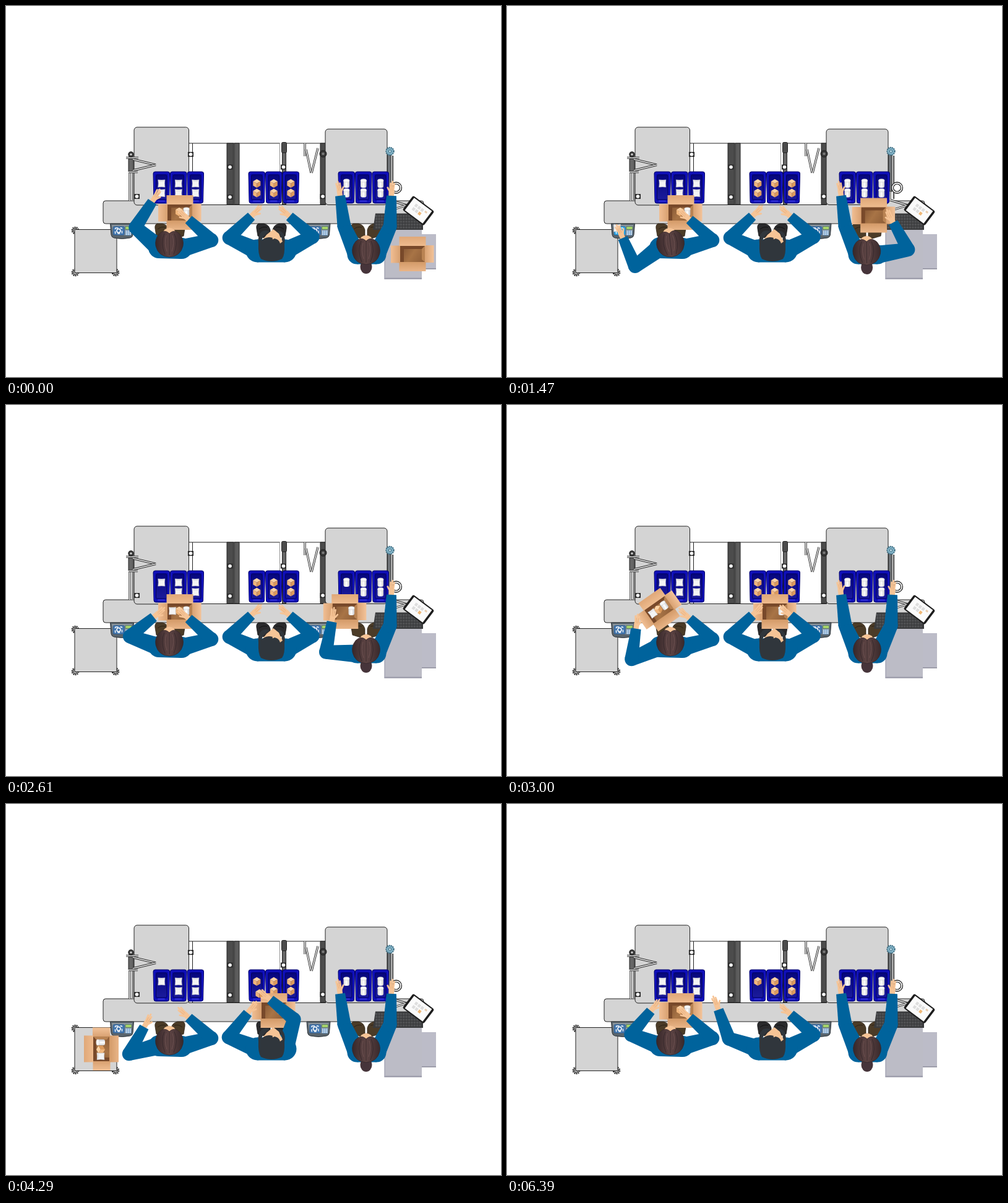
An HTML page with a canvas for the animation above (6420 ms loop, 800 by 600 pixels).

```html
<!DOCTYPE html>
<html lang="en">
<head>
<meta charset="utf-8">
<title>Packing line</title>
<style>
html, body { margin: 0; width: 100%; height: 100%; overflow: hidden; background: #fff; }
canvas { display: block; width: 800px; height: 600px; }
</style>
</head>
<body>
<canvas id="stage" width="800" height="600"></canvas>
<script>
const c = document.getElementById('stage').getContext('2d');
const LOOP = 6420, STEP = 30;
const GREY = '#d4d4d4', INK = '#232323', STEEL = '#4c4c4c', BLUE = '#00639c', SKIN = '#f6c496';

// ---- drawing helpers ----
function paint(fill, stroke, width = 1, path) {
  const p = path ? [path] : [];
  if (fill) { c.fillStyle = fill; c.fill(...p); }
  if (stroke) { c.strokeStyle = stroke; c.lineWidth = width; c.stroke(...p); }
}
function rect(x, y, w, h, fill, stroke, r = 0, width = 1) {
  c.beginPath(); c.roundRect(x, y, w, h, r); paint(fill, stroke, width);
}
function oval(x, y, rx, ry, fill, stroke, width) {
  c.beginPath(); c.ellipse(x, y, rx, ry, 0, 0, 7); paint(fill, stroke, width);
}
const disc = (x, y, r, fill, stroke, width) => oval(x, y, r, r, fill, stroke, width);
const shape = (d, fill, stroke, width) => paint(fill, stroke, width, new Path2D(d));
function line(x0, y0, x1, y1, col, width) {
  c.beginPath(); c.moveTo(x0, y0); c.lineTo(x1, y1); paint(null, col, width);
}
function dashed(dash, draw) { c.setLineDash(dash); draw(); c.setLineDash([]); }
function at(x, y, angle, draw) {
  c.save(); c.translate(x, y); c.rotate(angle); draw(); c.restore();
}
function mirror(x, draw) {
  for (const s of [-1, 1]) { c.save(); c.translate(x, 0); c.scale(s, 1); draw(); c.restore(); }
}
function fade(x0, y0, x1, y1, ...cols) {
  const g = c.createLinearGradient(x0, y0, x1, y1);
  cols.forEach((k, i) => g.addColorStop(i / (cols.length - 1), k));
  return g;
}
const rad = deg => deg * Math.PI / 180;
const between = (t, a, b) => t >= a && t < b;

// ---- workstation ----
function bracket(x, y) {
  rect(x - 4.5, y - 4, 9, 8, '#2b2b2b');
  disc(x, y, 2.8, '#fff');
}
function rod(x0, y0, x1, y1, w = 2) {
  c.lineCap = 'butt';
  line(x0, y0, x1, y1, INK, w + 1.4);
  line(x0, y0, x1, y1, '#eee', w - .4);
}
function caster(x, y) {
  dashed([2, 1.2], () => disc(x, y, 5.2, '#fff', '#2c2c2c', 2.2));
  disc(x, y, 3.6, '#bbb', INK);
}
function bench() {
  rect(157, 315, 518, 37, GREY, INK, 4);
  rect(295.5, 222, 221, 99.5, '#fff', INK);
  line(301.5, 222, 301.5, 321, INK, 1);
  rect(357, 222, 11, 99, STEEL, INK);
  rect(369, 222, 8, 99, '#5c5c5c', INK);
  line(442.5, 222, 442.5, 321, INK, 1);
  rect(442.5, 221, 4, 100, '#fff');
  rect(446.5, 237, 6, 84, '#666', INK);
  rect(445.5, 220.5, 8, 17, STEEL, INK, 2);
  rect(508, 222, 9, 99, STEEL, INK);
  bracket(362, 260.5); bracket(362, 309); bracket(448.5, 260.5); bracket(512, 308);
  rod(483, 222, 483, 243); rod(485, 232, 493, 270); rod(504, 230, 494, 270);
  rect(207, 196, 88.5, 126, GREY, INK, 5);
  rect(516, 199, 100, 122.5, GREY, INK, 5);
  disc(512.5, 239, 5.5, '#333', INK); disc(512.5, 239, 2.3, '#777');
  bracket(298.5, 240);
}
function sideArms() {
  rod(200, 240, 200, 315); rod(205, 240, 205, 314, 1.4);
  rect(198, 247, 8, 21, '#666', INK);
  rod(205, 248, 242, 257); rod(205, 266, 242, 257);
  rod(194, 245.5, 214, 245.5); rod(198, 268.5, 213, 268.5);
  disc(202, 240, 4, '#444', INK, 1.5); disc(202, 240, 1.6, '#ddd');
  bracket(211.5, 308);

  rect(616.5, 238, 5.5, 62, '#707478', INK);
  rod(625, 242, 625, 312, 1); rod(619, 300, 619, 315);
  dashed([2, 1], () => disc(620.5, 235, 6.2, '#7fb0c4', '#3f6e83', 2));
  disc(620.5, 235, 2.2, '#b9d8e4', '#3f6e83');
  disc(630.5, 294, 9, '#fff', INK, 1.3); disc(630.5, 294, 6, '#fff', INK, 1.2);
  rod(620, 314, 650, 323); rod(613, 333, 648, 322);
}
function cart() {
  caster(112, 363); caster(112, 431); caster(177, 431);
  rect(111, 361.5, 68, 70, GREY, INK);
}
function scale(x, lit) {
  at(x, 352, 0, () => {
    shape('M0 0H38L36.500 18Q36 22 32 23Q19 26 6 23Q2 22 1.500 18z', '#59646c', '#30363b');
    shape('M2.500 2H35.500L34 17Q19 21 4 17z', '#8b959c');
    rect(4.5, 4.5, 18.5, 14, lit ? '#27a3e6' : '#3f74ad', '#2f5580', 2, .6);
    disc(13.5, 11.5, 3, null, '#fff', 1.5);
    dashed([4, 3], () => rect(8, 7, 11, 9, null, '#fff', 1, 1.4));
    rect(24.5, 4.5, 10, 5, '#a7d36a', '#466', 0, .7);
    rect(24.5, 11, 9.5, 8, '#5a8fc4', null, 1);
    for (let i = 0; i < 9; i++) rect(25 + i % 3 * 3.1, 11.5 + (i / 3 | 0) * 2.5, 2.3, 1.7, '#e6edf2');
  });
}
function tablet() {
  rect(-21.5, -14.5, 43, 29, '#1d1d1d', null, 3);
  rect(-18, -12.5, 36, 25, '#fbfbfb');
  for (let i = 0; i < 6; i++)
    rect(-10 + i % 3 * 6, -7 + (i / 3 | 0) * 7, 4.5, 5, i === 5 ? '#efb878' : '#dedede');
  rect(9, -7, 4, 3, '#e9cdb0');
}
function desk() {
  rect(672, 369, 23, 57, '#bcbcc8'); rect(672, 424, 23, 2, '#9d9daa');
  rect(611.5, 362, 60.5, 80, '#bcbcc6'); rect(611.5, 439.5, 60.5, 2.5, '#a0a0ae');
  rect(611.5, 362, 1.5, 79, '#a9a9b8');
  shape('M597 335.500H674V362H593z', '#3a3b3d');
  for (let i = 0; i < 85; i++)
    rect(597 + i % 17 * 4.4, 338 + (i / 17 | 0) * 4.6, 3.4, 3.4, '#505153', null, .6);
  at(666.5, 331, rad(37), tablet);
}
function bin(x) {
  shape(`M${x} 271q0-3 3-3h20.500q3 0 3 3l-1 45q0 3-3 3h-18.500q-3 0-3-3z`, '#0a0aae', '#05056e');
  rect(x + 2, 270, 22.5, 46, null, '#1a1acc', 2);
  rect(x + 4.5, 273, 17.5, 40, fade(0, 273, 0, 313, '#06067c', '#1b1b9c'), '#04045e', 2);
  rect(x + 7, 314.5, 12, 2, '#3434da', null, 1);
}

// ---- goods ----
const goods = {
  pouch() {
    shape('M-5.500-6Q0-5 5.500-6Q4.500 0 5.500 6Q0 5-5.500 6Q-4.500 0-5.500-6z', '#f4f4f4', '#c4c4ca', .6);
    line(-4, -3.5, 4, -3.5, '#d5d5da', .8);
  },
  cube() {
    shape('M0-7L6-3.500L0 0L-6-3.500z', '#fbd3a4');
    shape('M-6-3.500L0 0V7L-6 3.500z', '#f0b67c');
    shape('M6-3.500L0 0V7L6 3.500z', '#dc9a5c');
  },
  can() {
    rect(-4.8, -7, 9.6, 14, fade(-5, 0, 5, 0, '#d4d4d4', '#fff', '#c4c4c8'), null, 3);
    oval(0, -4.6, 4.8, 2.6, '#f7f7f7', '#c9c9cc', .6);
  }
};
const item = (kind, x, y) => at(x, y, 0, goods[kind]);
function rack(x, kind, taken) {
  for (let col = 0; col < 3; col++) {
    bin(x + col * 27.5);
    item(kind, x + 13.3 + col * 27.5, 287);
    if (col || !taken) item(kind, x + 13.3 + col * 27.5, 302.5);
  }
}
function carton([x, y, deg], load) {
  at(x, y, rad(deg), () => {
    rect(-21, -14, 42, 28, fade(-20, -13, 20, 13, '#7d5030', '#a87446', '#8c5c37'));
    shape('M-21-14H21L15-8H-14V14H-21z', '#78492a');
    shape('M21-14V14L15 9V-8z', '#b98353');
    load.forEach(kind => item(kind, { pouch: -12, cube: -1, can: 10.5 }[kind], -1));
    rect(-35, -13.5, 15, 28, fade(-35, 0, -20, 0, '#f0be93', '#d8a070'));
    rect(20, -14, 14.5, 28, fade(20, 0, 34, 0, '#d9a273', '#f2c298'));
    rect(-21.5, -28, 43, 15, fade(0, -28, 0, -13, '#e0a878', '#eebb8e'));
    rect(-21.5, 13, 43, 15, fade(0, 13, 0, 28, '#d39a68', '#e9b588'));
  });
}

// ---- people ----
const UPPER = 50, FORE = 73, HAND = 23;

function limb(x0, y0, r0, x1, y1, r1) {
  disc(x0, y0, r0, BLUE);
  at(x0, y0, Math.atan2(y1 - y0, x1 - x0), () => {
    const len = Math.hypot(x1 - x0, y1 - y0);
    shape(`M0 ${-r0}L${len} ${-r1}V${r1}L0 ${r0}z`, BLUE);
  });
}
function hand(side) {
  c.scale(1, side);
  c.lineCap = 'round';
  for (const f of [-1, 0, 1]) line(8, f * 2.4, HAND - 3 * Math.abs(f), f * 3 - .8, SKIN, 2.7);
  line(5, 2, 13, 6.8, SKIN, 2.8);
  shape('M-3-4L8-4.500Q13-4 13 0Q13 4 8 4.300L-3 4z', SKIN);
  for (const f of [-1.2, 1.2]) line(9, f, 17, f * 1.4, '#dfa673', .6);
}
// Two-bone arm: the elbow follows from shoulder and fingertip; bend is -1 for a left arm, 1 for a right.
function arm([sx, sy], [hx, hy], bend) {
  const d = Math.min(Math.hypot(hx - sx, hy - sy), UPPER + FORE - 1);
  const open = Math.acos((UPPER ** 2 + d ** 2 - FORE ** 2) / (2 * UPPER * d));
  const a = Math.atan2(hy - sy, hx - sx) + bend * open;
  const ex = sx + Math.cos(a) * UPPER, ey = sy + Math.sin(a) * UPPER;
  const k = 1 - HAND / FORE, wx = ex + (hx - ex) * k, wy = ey + (hy - ey) * k;
  at(wx, wy, Math.atan2(hy - ey, hx - ex), () => hand(-bend));
  limb(sx, sy, 14.5, ex, ey, 11);
  limb(ex, ey, 11, wx, wy, 8);
}
function legs(x, col, edge) {
  mirror(x, () => {
    shape('M2 362Q4 354 12 352H21Q25 354 24 360L22 372L2 378z', col, edge, .8);
    shape('M7 358Q14 356 20 361', null, edge);
  });
}
function longHair(bun) {
  oval(0, -16, 10, 8, SKIN);
  shape('M-3-21L0-25L3-21z', SKIN);
  if (bun) oval(0, 27, 9.5, 11, '#46343a');
  shape('M0-15Q8-23 17-14Q24-5 22 5Q18 22 0 23Q-18 22-22 5Q-24-5-17-14Q-8-23 0-15z',
    fade(-22, 0, 22, 0, '#38282a', '#5d4444', '#3a2a2c'), '#33262a', .7);
  line(0, -15, 0, 20, '#33262a', .8);
  mirror(0, () => {
    shape('M8-15Q15 0 7 19', null, '#33262a', .8);
    shape('M5-12Q9 0 4 14', null, '#705453', .9);
  });
}
function shortHair() {
  shape('M-8-18L3-27L12-20L16-10H-14z', SKIN);
  shape('M-21-4Q-23-16-16-23Q-8-27-3-23Q-13-18-16-9Q-5-18 4-13Q10-14 13-7L17-10Q16-19 8-23Q15-26 19-20Q23-13 21-3Q22 15 17 21Q0 29-17 21Q-22 14-21-4z', '#30363c');
  shape('M-14-11Q-4-21 7-18Q16-15 18-7L14-4Q12-11 5-12Q0-9 2-13Q-6-16-14-11z', SKIN);
}
function worker(left, right, size, tips, head) {
  arm(left, tips[0], -1);
  arm(right, tips[1], 1);
  limb(...left, size, ...right, size);
  disc(...right, size, BLUE);
  at(...head);
}

// ---- motion ----
// A plan lists stays as [from, to, place]; between stays the value eases onward.
function follow(plan, t) {
  const i = plan.findLastIndex(s => s[0] <= t), [, end, here] = plan[i], next = plan[i + 1];
  if (!next || t <= end) return here;
  const u = (t - end) / (next[0] - end), e = u * u * (3 - 2 * u);
  return here.map((v, k) => v + (next[2][k] - v) * e);
}

const dockA = [281, 334, 0], dockB = [433, 334, 0], dockC = [588, 334, 0];
const mat = [657, 401, 0], trolley = [154, 396, -90], lifted = [246, 331, -35];
const doneBox = [[0, 2640, dockA], [3000, 3000, lifted], [3600, LOOP, trolley]];
const newBox = [[0, 990, mat], [1560, 2490, dockC], [2850, 5970, dockB], [6270, LOOP, dockA]];

const nearBox = ([x, y], dx, dy = -8) => [x + dx, y + dy];
const rest = { aL: [252, 333], aR: [278, 330], bL: [413, 324], bR: [441, 325], cL: [537, 284], cR: [624, 284] };
const scaleA = [178, 354], scaleB = [499, 356];

const aLeft = [
  [0, 90, [249, 297]], [720, 1650, scaleA], [2100, 2100, [237, 321]], [2370, 2460, nearBox(dockA, -14)],
  [3000, 3000, nearBox(lifted, -34, 8)], [3600, 3840, nearBox(trolley, -13, -14)],
  [4440, 5940, rest.aL], [6300, LOOP, [247, 317]]
];
const bLeft = [
  [0, 3000, rest.bL], [3660, 5850, nearBox(dockB, -28, -14)],
  [6270, 6270, nearBox(dockA, 40)], [6390, LOOP, [334, 311]]
];
const bRight = [
  [0, 3330, rest.bR], [3750, 3750, [429, 298]], [4020, 4200, [405, 299]],
  [4890, 5160, scaleB], [5610, 5730, nearBox(dockB, -2)], [6000, LOOP, rest.bR]
];
const cLeft = [
  [0, 2310, rest.cL], [2490, 2490, nearBox(dockC, -26)], [2730, 2730, [500, 330]], [2970, LOOP, rest.cL]
];
const cRight = [
  [0, 120, rest.cR], [750, 960, nearBox(mat, 36)], [1560, 1680, nearBox(dockC, 20)],
  [1950, 1950, [552, 299]], [2100, 2100, [564, 302]], [2310, 2370, nearBox(dockC, 0)], [2610, LOOP, rest.cR]
];
const aHead = [[0, 90, [0]], [720, 2100, [-7]], [2700, LOOP, [0]]];
const cHead = [
  [0, 120, [582, 395, 0]], [750, 960, [586, 397, 82]],
  [1560, 2310, [581, 396, -6]], [2610, LOOP, [582, 395, 0]]
];
// When each item leaves its bin and lands in a carton.
const pouchTrip = [90, 2400], cubeTrip = [4110, 5640], canTrip = [1950, 2310];
const REFILL = 4410, CLEAR = 4560;

function carry(kind, t, trip, [x, y]) {
  if (between(t, ...trip)) item(kind, x, y + 5);
}

function draw(t) {
  rect(0, 0, 800, 600, '#fff');
  bench(); sideArms(); cart();
  scale(168.5, between(t, 600, 2250));
  scale(486, between(t, 4800, 5430));
  rack(238, 'pouch', between(t, pouchTrip[0], REFILL));
  rack(392, 'cube', t >= cubeTrip[0]);
  rack(537, 'can', t >= canTrip[0]);
  legs(265, '#4b3b27', '#2d2316'); legs(429, '#2a2a2c', '#121212'); legs(582, '#4b3b27', '#2d2316');
  desk();

  c.globalAlpha = Math.max(0, Math.min(1, 1 - (t - CLEAR) / 270));
  carton(follow(doneBox, t), t >= pouchTrip[1] ? ['can', 'cube', 'pouch'] : ['can', 'cube']);
  c.globalAlpha = 1;
  const load = [];
  if (t >= canTrip[1]) load.push('can');
  if (t >= cubeTrip[1]) load.push('cube');
  carton(follow(newBox, t), load);

  const aL = follow(aLeft, t), bR = follow(bRight, t), cR = follow(cRight, t);
  carry('pouch', t, pouchTrip, aL);
  carry('cube', t, cubeTrip, bR);
  carry('can', t, canTrip, cR);

  const [tilt] = follow(aHead, t), [hx, hy, turn] = follow(cHead, t);
  worker([247, 391], [284, 392], 17, [aL, rest.aR], [264, 383, rad(tilt), () => longHair()]);
  worker([406, 396], [451, 396], 18.5, [follow(bLeft, t), bR], [429, 388, 0, shortHair]);
  worker([567, 402], [599, 402], 15.5, [follow(cLeft, t), cR], [hx, hy, rad(turn), () => longHair(true)]);
}

const start = performance.now();
function tick() {
  const t = (performance.now() - start) % LOOP;
  draw(Math.floor(t / STEP) * STEP);
  requestAnimationFrame(tick);
}
tick();
</script>
</body>
</html>
```
